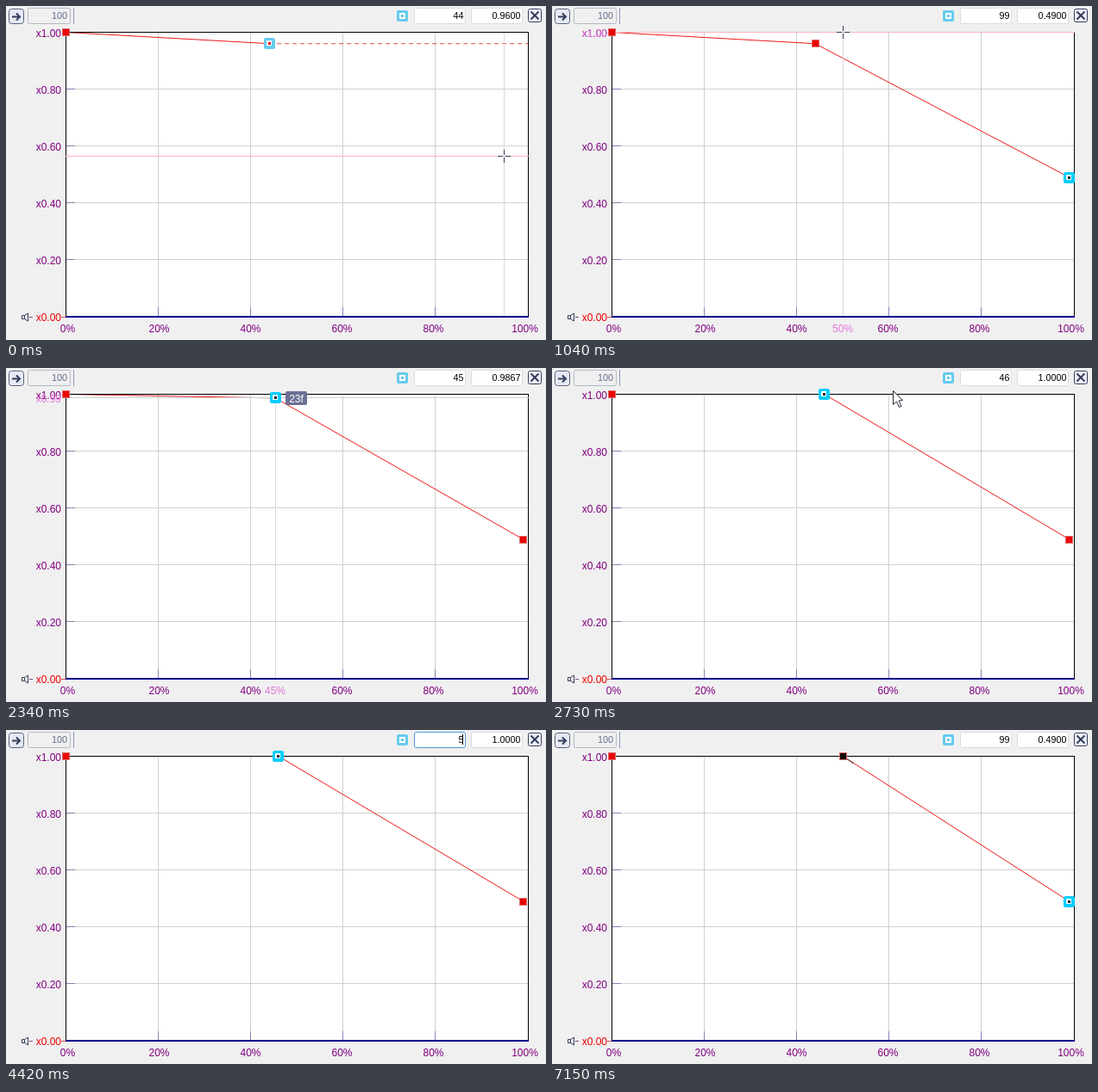
These frames come from a looping animation (626x388 px, 8000 ms). An HTML page with a canvas:

```html
<!DOCTYPE html>
<html>
<head>
<meta charset="utf-8">
<style>
html, body { margin: 0; width: 100%; height: 100%; overflow: hidden; background: #f0f0f0; }
canvas { display: block; }
</style>
</head>
<body>
<canvas id="stage" width="626" height="388"></canvas>
<script>
const c = document.getElementById('stage').getContext('2d');
const LOOP = 8000, TICK = 130;
const PURPLE = '#800080', VIOLET = '#e478dc', CYAN = '#00ccfa', PALE = '#66cbee', INK = '#343c5c';

// Pointer path: time, x, y
const path = [
  [0, 577, 174], [390, 599, 198], [520, 599, 198], [780, 480, 106], [1040, 337, 30],
  [1300, 329, 34], [1820, 301, 43], [2080, 305, 43], [2470, 315, 30], [2600, 345, 27],
  [2730, 395, 26], [2860, 604, 20], [3380, 524, 10], [3900, 535, 11], [4030, 592, 11]
];

const px = p => 69.5 + p * 5.355;
const py = v => 361 - v * 330.5;

function pointer(t) {
  const i = path.findIndex(k => k[0] > t);
  if (i < 0) return path[path.length - 1].slice(1);
  const [a, b] = [path[i - 1], path[i]], u = (t - a[0]) / (b[0] - a[0]);
  return [1, 2].map(j => Math.round(a[j] + (b[j] - a[j]) * u));
}

function rect(x, y, w, h, color) {
  c.fillStyle = color;
  c.fillRect(x, y, w, h);
}

function box(x, y, w, h, r, fill, edge) {
  c.beginPath();
  c.roundRect(x, y, w, h, r);
  c.fillStyle = fill;
  c.fill();
  if (edge) {
    c.strokeStyle = edge;
    c.lineWidth = 1;
    c.stroke();
  }
}

function line(points, color, width = 1, dash = []) {
  c.beginPath();
  points.forEach(p => c.lineTo(...p));
  c.strokeStyle = color;
  c.lineWidth = width;
  c.setLineDash(dash);
  c.stroke();
  c.setLineDash([]);
}

function text(s, x, y, color, align = 'right', size = 12) {
  c.font = size + 'px "Liberation Sans", Arial, sans-serif';
  c.textAlign = align;
  c.fillStyle = color;
  c.fillText(s, x, y);
}

function field(x, s, { focus, selected, caret } = {}) {
  box(x + .5, 2.5, 59, 18, 2, '#fff', focus ? '#4a9ae0' : '#dcdce0');
  const right = x + 57.5;
  if (selected) rect(right - s.length * 6 + (s.includes('.') ? 3 : 0), 5, s.length * 6 - (s.includes('.') ? 3 : 0), 13, '#3399ff');
  text(s, right, 15, selected ? '#fff' : '#000', 'right', 10.8);
  if (caret) rect(x + 56, 5, 1, 12, selected ? '#cc6600' : '#000');
}

function toolbar(s) {
  box(3.5, 3.5, 17, 17, 3, '#e6e9f4', '#59617f');
  line([[7, 12.5], [16, 12.5]], INK, 2);
  line([[12, 8.5], [16, 12.5], [12, 16.5]], INK, 2);
  box(25.5, 2.5, 49, 18, 2, '#f0f0f0', '#b4b8c8');
  text('100', 71, 15, '#626a8c', 'right', 10.8);
  rect(78, 2, 1, 19, '#8c94c4');

  box(453, 5, 13, 13, 2, PALE);
  rect(456, 8, 7, 7, '#fff');
  rect(458, 10, 3, 3, PALE);
  field(473, s.percent, s.first);
  field(539, s.value, s.second);

  box(605.5, 3.5, 15, 15, 2, '#eef0f8', INK);
  line([[608.5, 6.5], [617.5, 15.5]], INK, 2);
  line([[617.5, 6.5], [608.5, 15.5]], INK, 2);
}

function chart() {
  rect(69, 30, 537, 332, '#fff');
  for (let i = 1; i < 5; i++) {
    const x = 69 + i * 107, y = 30 + i * 66;
    rect(x, 31, 1, 330, '#d0d0d0');
    rect(70, y, 535, 1, '#d0d0d0');
    rect(70, y, 10, 1, '#8484b4');
    rect(x, 350, 1, 10, '#8484b4');
  }
  for (let i = 0; i < 6; i++) {
    text('x' + (1 - i / 5).toFixed(2), 64, 35.5 + i * 66, i < 5 ? PURPLE : '#f00000');
    text(i * 20 + '%', 71.5 + i * 106, 379, PURPLE, 'center');
  }
  // Speaker mark at the zero level
  box(18.5, 359.5, 3, 4, 0, '#f0f0f0', INK);
  line([[21.5, 359.5], [25.5, 357], [25.5, 366], [21.5, 363.5]], INK);
  rect(27, 361, 4, 1, '#805070');
  rect(64, 361, 5, 1, '#d05050');
}

function frame() {
  rect(69, 30, 537, 1, '#000');
  rect(69, 30, 1, 332, '#000');
  rect(605, 30, 1, 332, '#000');
  rect(69, 360, 537, 2, '#000090');
}

function guides([x, y], t) {
  const hover = t >= 1820;
  rect(69, y, 537, 1, hover ? '#d0d0d0' : '#ffb4be');
  rect(x, 31, 1, 329, '#d8d8de');
  if (t < TICK) return;
  const percent = Math.round((x - 69.5) / 5.355), value = (361 - y) / 330.5;
  text('x' + Math.min(1, value).toFixed(2), 64, y + 5.5, VIOLET);
  text(percent + '%', x, 379, VIOLET, 'center');
}

function cross([x, y]) {
  rect(x - 7, y, 6, 1, INK);
  rect(x + 2, y, 6, 1, INK);
  rect(x, y - 7, 1, 6, INK);
  rect(x, y + 2, 1, 6, INK);
}

function arrow([x, y]) {
  c.beginPath();
  [[0, 0], [0, 16], [4, 12.5], [7, 19], [9.5, 18], [6.5, 11.5], [11, 11]]
    .forEach(([dx, dy]) => c.lineTo(x + dx + .5, y + dy + .5));
  c.closePath();
  c.fillStyle = '#fff';
  c.fill();
  c.strokeStyle = '#302838';
  c.lineWidth = 1;
  c.stroke();
}

function beam([x, y]) {
  rect(x, y - 6, 1, 14, '#000');
  rect(x - 2, y - 7, 5, 1, '#000');
  rect(x - 2, y + 8, 5, 1, '#000');
}

function tip(s, x, y) {
  box(x, y, 25, 16, 2, '#6b7096');
  text(s, x + 12.5, y + 12.5, '#fff', 'center');
}

function node([p, v], color = '#e80808') {
  const x = Math.floor(px(p)), y = Math.floor(py(v));
  rect(x - 4, y - 4, 9, 9, '#e06868');
  rect(x - 3, y - 3, 7, 7, color);
}

function marker([p, v], color, dot) {
  const x = Math.floor(px(p)), y = Math.floor(py(v));
  box(x - 6, y - 6, 13, 13, 2.5, color);
  rect(x - 3, y - 3, 6, 6, '#fff');
  rect(x - 1, y - 1, 3, 3, dot);
}

function draw(t) {
  const mouse = pointer(t);
  const added = t >= 390, dragged = t >= 2080, typed = t >= 4680, last = t >= 7020;
  const drag = Math.max(0, Math.min(1, (t - 2080) / 390));
  const mid = typed ? [50, 1] : [44 + 2 * drag, .96 + .04 * drag];
  const nodes = [[0, 1], mid];
  if (added) nodes.push([99, .49]);
  const active = !added || dragged && !last ? 1 : 2;
  const hover = t >= 1820 && t < 2080;
  const inPlot = t < 2600;

  rect(0, 0, 626, 388, '#f0f0f0');
  chart();
  const pts = nodes.map(([p, v]) => [px(p), py(v)]);
  line(pts, '#f01818');
  if (hover) line([[180, 37], pts[1]], '#a01050');
  if (last) line([pts[1], [350, 39]], '#402020');
  if (!added) line([pts[1], [605, pts[1][1]]], '#d84848', 1, [5, 4]);
  frame();
  if (inPlot) guides(mouse, t);

  node(nodes[0]);
  if (typed && t < 6890) tip('25f', 327, 31);
  nodes.slice(1).forEach((n, i) => {
    if (i + 1 === active) marker(n, added ? CYAN : PALE, added ? '#202830' : '#f01010');
    else node(n, last ? '#100808' : '#e80808');
  });
  if (hover) {
    c.beginPath();
    c.arc(305.5, 44, 8, 0, 7);
    c.fillStyle = '#fff';
    c.fill();
    c.strokeStyle = '#885098';
    c.lineWidth = 1;
    c.stroke();
    rect(302, 40, 8, 8, '#e80808');
    rect(303, 43, 6, 1, '#fff');
    tip('22f', 317, 36);
  }
  if (dragged && t < 2600) tip(mid[0] < 45 ? '22f' : '23f', Math.round(px(mid[0])) + 12, Math.round(py(mid[1])) - 8);

  const current = nodes[active];
  const typing = t >= 3510 && t < 4940, second = t >= 4940 && t < 6890;
  const blink = Math.floor((t - 4940) / 520) % 2 === 0;
  toolbar({
    percent: t >= 4420 && t < 4550 ? '5' : t >= 4550 && !typed ? '50' : String(Math.round(current[0])),
    value: current[1].toFixed(4),
    first: { focus: typing, selected: typing && t < 4420, caret: typing && t >= 4420 },
    second: { focus: second, selected: second, caret: second && blink }
  });

  if (inPlot) {
    if (!hover && !dragged) cross(mouse);
  } else if (t < 3380) arrow(mouse);
  else if (t < 4030) beam(mouse);
}

const start = performance.now();
function tick() {
  const t = Math.max(0, performance.now() - start) % LOOP;
  draw(Math.floor(t / TICK) * TICK);
  requestAnimationFrame(tick);
}
tick();
</script>
</body>
</html>
```
